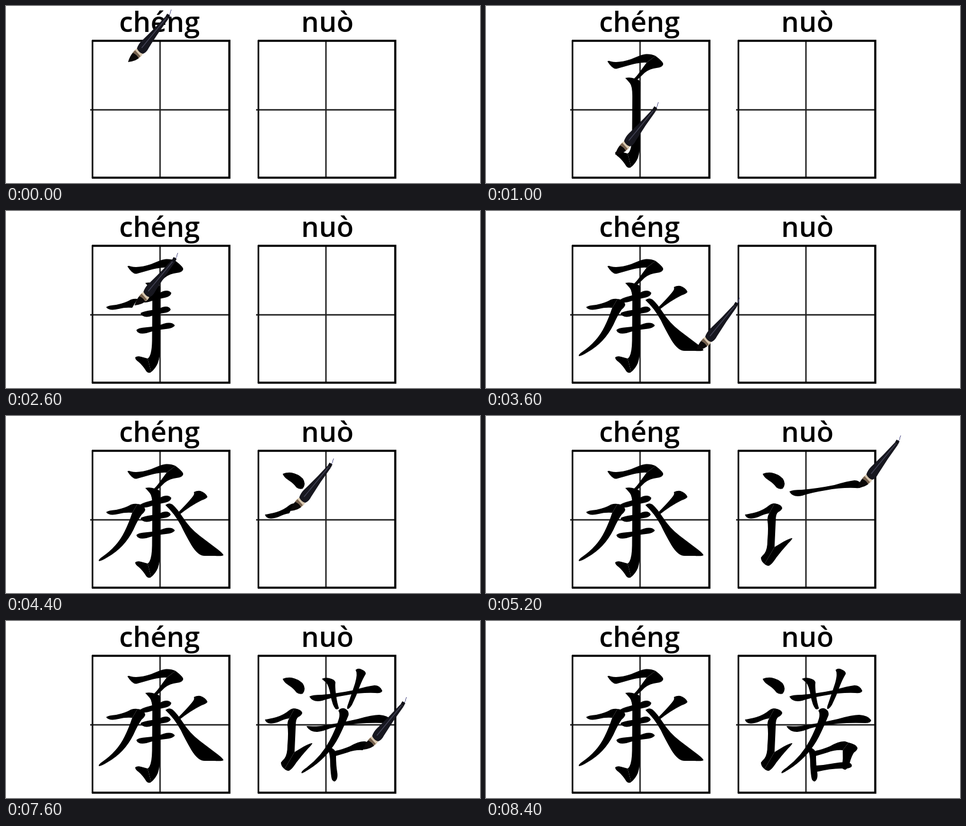
Animation, 800 px wide and 300 px high, one loop 8600 ms. Source, as an HTML page:

```html
<!DOCTYPE html>
<html lang="zh">
<head>
<meta charset="utf-8">
<title>Stroke order</title>
<style>
  html, body { margin: 0; width: 100%; height: 100%; overflow: hidden; background: #fff; }
  svg { display: block; width: 800px; height: 300px; }
  text { font: 600 47px "Open Sans", "Noto Sans", sans-serif; text-anchor: middle; }
  #ink path { visibility: hidden; }
</style>
</head>
<body>
<svg viewBox="0 0 800 300">
  <defs>
    <g id="grid" fill="none" stroke="#000">
      <path d="M142 176H377M260 59V291" stroke="#222" stroke-width="2.4"/>
      <path d="M146 58V292" stroke="#111" stroke-width="2.8"/>
      <path d="M145 59H377V291H145" stroke-width="3.6"/>
    </g>
  </defs>
  <text x="259" y="44">chéng</text>
  <text x="542.5" y="44">nuò</text>
  <use href="#grid"/>
  <use href="#grid" x="280"/>

  <!-- data-at: the step at which a stroke appears -->
  <g id="ink">
    <path data-at="1" d="M205 94Q206 92 211 94Q224 97 245 90Q263 82 270 81.5Q279 81 286 84.5L271 96Q262 95 243 100Q228 104 220 106.500Q213 107 205 94Z"/>
    <path data-at="2" d="M286 84.500Q300 95 299 99Q298 104 288 105Q277 106 268 113Q260 121 254 126Q251 126 250 123Q256 117 260 111L271 96Z"/>
    <path data-at="4" d="M235 122Q243 120 251 123Q260 125 260.500 130Q260 142 260 160L259.500 240Q259 262 245 273L239 250Q246 246 246.500 220L247 153Q247 136 243 131Q239 126 235 122Z"/>
    <path data-at="5" d="M218 248Q222 245 228 247L239 250L245 273Q241 276 237 272Q231 262 224 256Q218 252 218 248Z"/>
    <path data-at="7" d="M227 150Q231 147 243 144Q255 141 265 136Q275 133 279 139Q278 145 268 147Q254 150 241 154Q229 157 227 150Z"/>
    <path data-at="9" d="M227 173Q232 170 246 168Q256 167 264 163Q275 160 278 167Q276 172 266 173Q253 175 242 179Q230 181 227 173Z"/>
    <path data-at="11" d="M220 202Q222 198 238 197Q254 196 266 191Q280 187 285 194Q282 199 270 200Q252 202 237 207Q223 210 220 202Z"/>
    <path data-at="13" d="M169 163Q172 160 186 159Q201 156 211 150Q217 148 222 149L213 164Q201 163 190 166Q174 170 169 163Z"/>
    <path data-at="14" d="M222 149Q234 150 235 159Q234 163 229 167Q222 177 215 193Q200 223 172 239Q161 246 157 246Q155 244 162 239Q188 221 200 196Q207 182 213 164Z"/>
    <path data-at="16" d="M317 129Q323 126 328 127Q337 130 340 137Q339 140 330 143Q312 152 293 167L290 164Q305 149 314 138Q319 132 317 129Z"/>
    <path data-at="18" d="M269 151Q275 146 281 150Q289 157 298 171Q310 190 327 203L352 222Q367 233 367 236Q365 238 352 237H335Q324 237 313 219Q302 200 295 185Q284 165 269 151Z"/>

    <path data-at="20" d="M467 98Q474 95 482 96Q493 98 501 106Q507 115 501 123Q495 125 490 121Q485 114 477 109Q469 104 467 98Z"/>
    <path data-at="22" d="M437 167Q444 166 456 163Q469 159 477 152Q482 148 487 148L478 165Q470 166 460 171Q440 178 437 167Z"/>
    <path data-at="23" d="M487 148Q499 150 500 156Q499 160 493 163Q489 166 489 177Q488 200 487 222L470 251Q464 246 464 240Q466 237 470 233Q475 226 475 211Q477 188 475 177Q475 169 478 165Z"/>
    <path data-at="24" d="M487 222Q494 218 502 213Q515 206 517 207Q517 209 510 216Q499 228 490 240Q481 254 476 254Q472 253 470 251Z"/>
    <path data-at="26" d="M512 128Q517 125 533 125Q558 123 588 117Q611 110 622 109Q631 109 635 118Q635 123 623 122Q600 121 573 126Q548 130 534 135Q518 139 512 128Z"/>
    <path data-at="28" d="M533 98Q539 95 546 97Q555 99 556 104Q555 110 557 125Q559 140 562 148Q559 151 556 149Q551 143 548 127Q545 109 540 104Q536 101 533 98Z"/>
    <path data-at="30" d="M590 83Q594 79 600 82Q608 85 607 90Q602 98 597 111Q591 128 584 142Q579 150 576 149Q575 146 578 139Q584 121 589 106Q594 89 590 83Z"/>
    <path data-at="32" d="M507 178Q516 179 531 178Q564 173 594 166Q618 159 630 159Q645 160 650 168Q650 173 640 173Q616 172 594 174Q565 177 547 182Q535 187 525 188Q512 188 507 178Z"/>
    <path data-at="34" d="M561 152Q565 147 571 148Q580 152 578 160Q570 180 562 196Q546 227 518 247Q502 258 499 258Q497 256 505 250Q532 230 546 203Q557 182 562 165Q564 156 561 152Z"/>
    <path data-at="36" d="M541 213Q546 212 551 216Q558 220 557 228Q557 245 559 256Q561 268 555 272Q550 272 549 264Q547 250 547 235Q546 220 541 213Z"/>
    <path data-at="38" d="M556 220Q570 217 581 212Q596 203 606 204L612 206L602 219Q590 218 576 223L556 229Z"/>
    <path data-at="39" d="M612 206Q625 209 627 215Q627 219 621 223Q617 229 614 240Q612 249 607 252Q601 252 601 246Q603 233 602 219Z"/>
    <path data-at="41" d="M557 245Q572 244 588 241Q603 238 613 240Q619 243 617 247Q612 251 600 250Q580 250 557 256Z"/>
  </g>

  <!-- the brush tip is at 0,0 -->
  <g id="brush">
    <path d="M0 0Q3 -11 10 -18L21 -10Q16 -2 0 0Z" fill="#0b0808"/>
    <path d="M8 -16Q11 -21 15 -23L25 -14Q22 -8 18 -7Q15 -13 8 -16Z" fill="#d8c8b0"/>
    <path d="M8 -16L12 -20L21 -10L18 -7Q15 -13 8 -16Z" fill="#76614e"/>
    <path d="M15 -23Q17 -30 23 -36Q44 -56 63 -77L68 -73Q51 -50 35 -24Q31 -16 25 -14Q18 -16 15 -23Z" fill="#17171f"/>
    <path d="M23 -24Q42 -47 64 -74" fill="none" stroke="#454558" stroke-width="1.3"/>
    <path d="M63 -77L66 -82L71 -79L68 -73Z" fill="#111118"/>
    <path d="M69 -80Q72 -82 71.500 -85L73 -89" fill="none" stroke="#50508a"/>
  </g>
</svg>
<script>
  const STEP = 200, COUNT = 43;
  // Brush tip at each step; the last step has no brush.
  const tips = `206,95 274,95 250,126 250,126 248,262 218,252 229,150 273,141 229,174 273,168
    222,203 279,195 171,164 217,160 158,246 326,139 292,167 271,151 355,236 469,101
    498,122 440,170 480,161 471,246 515,208 514,131 627,122 538,101 558,149 596,87
    577,148 507,183 642,169 566,155 500,257 544,215 555,269 556,225 603,218 604,250
    558,250 612,246`.trim().split(/\s+/);
  const strokes = document.querySelectorAll('#ink path');
  const brush = document.getElementById('brush');
  const start = performance.now();
  let shown = -1;

  function draw() {
    const step = Math.floor((performance.now() - start) / STEP) % COUNT;
    if (step !== shown) {
      shown = step;
      for (const s of strokes) s.style.visibility = step >= s.dataset.at ? 'visible' : 'hidden';
      const tip = tips[step];
      brush.style.visibility = tip ? 'visible' : 'hidden';
      if (tip) brush.setAttribute('transform', `translate(${tip})`);
    }
    requestAnimationFrame(draw);
  }
  draw();
</script>
</body>
</html>
```
